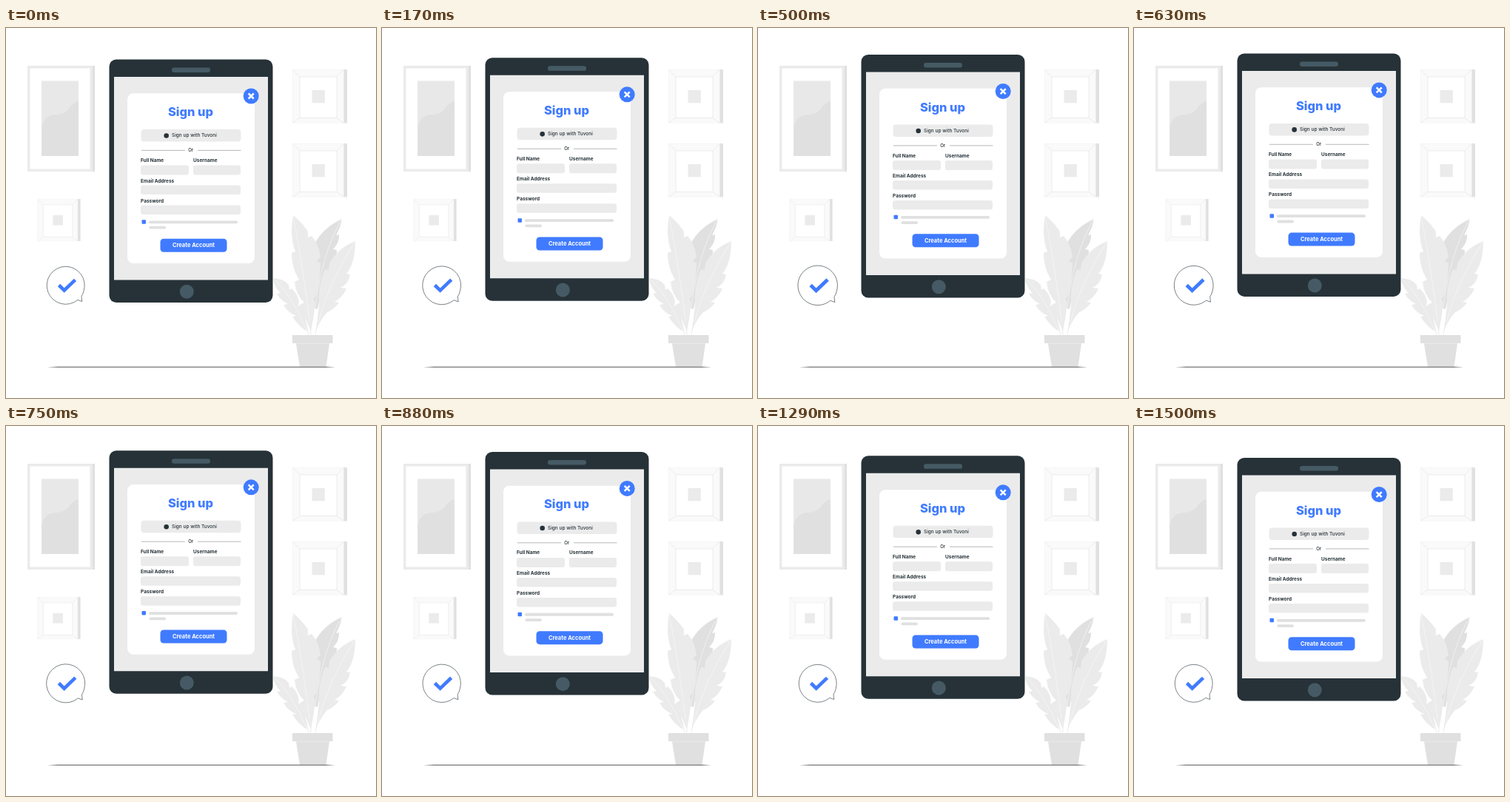
Write an HTML page that moves like this. It is 500 px wide and 500 px high and loops after 1.54 s.

```html
<!DOCTYPE html>
<html lang="en">
<head>
<meta charset="utf-8">
<title>Sign up</title>
<style>
  html, body { margin: 0; height: 100%; overflow: hidden; background: #fff; }
  svg { display: block; width: 100vw; height: 100vh; font: 700 6.5px Inter, sans-serif; fill: #263238; }
  .blue { fill: #407bff; }
  .pale { fill: #ebebeb; }
  .grey { fill: #e0e0e0; }
  .white { fill: #fff; }
  .slate { fill: #455a64; }
  .line { fill: none; stroke: #e6e6e6; stroke-width: .7; }
  .vein { fill: none; stroke: #fafafa; stroke-width: .6; }
</style>
</head>
<body>
<svg viewBox="0 0 500 500">
  <defs>
    <g id="frame">
      <path class="grey" d="M69 0h5v72.500h-5z"/>
      <path fill="#fafafa" stroke="#f0f0f0" stroke-width=".6" d="M.3.3h69v72H.3z"/>
      <path class="line" d="M.5.5 10 10M69 .5 60 10M.5 72 10 65.500M69 72 60 65.500"/>
      <path class="line" style="fill:#fff" d="M10 10h50v55.500H10z"/>
      <path class="pale" d="M26.500 28h17.300v17.300H26.500z"/>
    </g>
  </defs>

  <!-- Wall -->
  <path class="grey" d="M113 51h7v143h-7z"/>
  <path class="pale" d="M29 51h88v143H29z"/>
  <path class="white" d="M32.500 54.500h81v136h-81z"/>
  <path fill="#e8e8e8" d="M48 71.500h50V173H48z"/>
  <path class="grey" d="M48 135C50 124 57 118 66 117C74 117 80 115 85 109C89 103 93 100 98 99V173H48z"/>
  <use href="#frame" x="387" y="56"/>
  <use href="#frame" x="387" y="156"/>
  <use href="#frame" transform="translate(42.500 231) scale(.785)"/>

  <!-- Plant -->
  <path class="pale" d="M361 338Q376 339 382 347L383 354L386 352Q394 359 396 370L395 376L399 374Q406 390 407 410Q396 404 387 390L392 389Q380 384 375 374L381 373Q371 368 366 359L371 358Q362 350 361 338z"/>
  <path class="grey" d="M454 258Q428 270 417 292Q412 330 416 378L421 380Q424 360 432 344L441 330L437 326Q448 313 447 300L442 299Q451 290 450 279L446 280Q452 270 454 258z"/>
  <path class="pale" d="M472 288Q448 298 437 318L436 327L431 326Q421 350 423 374L419 410Q424 395 434 384Q444 380 450 371L444 370Q455 364 460 352L452 351Q463 346 465 333L460 332Q472 318 472 288z"/>
  <path class="pale" d="M388 253Q401 264 408 275L408 283L413 281Q423 292 425 310L420 314L425 318Q424 345 419 362L415 366L418 370Q416 390 412 410Q402 386 397 374L403 371Q392 361 390 343L396 340Q386 325 386 304L391 302Q383 282 388 253z"/>
  <path class="vein" d="M388 254Q402 325 412 410M454 258Q428 300 418 378M472 288Q434 345 419 410M361 338Q386 360 407 410"/>
  <path class="line" d="M406 400 409 415M411 395 412 415M421 397 418 415"/>
  <path class="grey" d="M387 415h54.500v11H387zM392 426.500h45L432.500 458H397z"/>
  <path class="line" d="M392 426.300h45"/>
  <path fill="#8c8c8c" d="M56 458.200 70 457.500H432L445 458.200 432 458.900H70z"/>

  <g id="bubble">
    <path fill="#fff" stroke="#263238" stroke-width=".6" d="M97 367.400A25.500 25.500 0 1 1 105 355.500Q104 360 102 362.500L102.700 369.500z"/>
    <path fill="none" stroke="#407bff" stroke-width="4.600" d="M71.500 347.500 78.700 354.500 93.500 340.300"/>
  </g>

  <g id="tablet">
    <rect x="139.500" y="42.500" width="221" height="328.500" rx="9.500"/>
    <rect class="slate" x="224" y="53.500" width="52" height="6.500" rx="3.200"/>
    <circle class="slate" cx="244.300" cy="356.200" r="9.500"/>
    <path class="pale" d="M146 66h208v274.500H146z"/>
    <rect class="white" x="164" y="88.300" width="172" height="229.700" rx="8"/>
    <circle class="blue" cx="331.200" cy="92" r="10.500"/>
    <path stroke="#fff" stroke-width="2.500" d="m327.700 88.500 7 7m0-7-7 7"/>
    <text class="blue" x="249.500" y="119" text-anchor="middle" font-size="16.500" font-weight="800">Sign up</text>

    <g class="pale">
      <rect x="182.500" y="137" width="135" height="16.500" rx="4"/>
      <rect x="182" y="185.500" width="65" height="13" rx="3"/>
      <rect x="253" y="185.500" width="64" height="13" rx="3"/>
      <rect x="182" y="212.500" width="135" height="12.500" rx="3"/>
      <rect x="182" y="239.500" width="135" height="12.500" rx="3"/>
    </g>
    <circle cx="216.700" cy="145.500" r="3.300"/>
    <text x="224" y="147.500" font-weight="500">Sign up with Tuvoni</text>
    <path stroke="#999" stroke-width=".7" d="M183 165.400h59m17 0h58.500"/>
    <text x="249.700" y="167.300" text-anchor="middle" font-size="6" font-weight="500">Or</text>
    <text x="182" y="181">Full Name</text>
    <text x="253" y="181">Username</text>
    <text x="182" y="208.600">Email Address</text>
    <text x="182" y="235.600">Password</text>

    <rect class="blue" x="183.500" y="259.300" width="5.500" height="5.500" rx="1"/>
    <rect class="grey" x="193" y="260.400" width="120" height="3.800" rx="1.900"/>
    <rect class="grey" x="193.500" y="267.700" width="22.500" height="3.800" rx="1.900"/>
    <rect class="blue" x="208.500" y="284.700" width="90" height="18" rx="4.500"/>
    <text class="white" x="253.500" y="296.200" text-anchor="middle" font-size="7.500">Create Account</text>
  </g>
</svg>
<script>
  const LOOP = 1540, STEP = 1000 / 24, STEPS = 37;
  const tablet = document.getElementById('tablet');
  const bubble = document.getElementById('bubble');
  const start = performance.now();

  function draw() {
    const time = (performance.now() - start) % LOOP;
    const step = Math.floor(time / STEP + 0.1);

    // The tablet floats up and down at constant speed
    const phase = (step + 1) / STEPS;
    const lift = 10 * (1 - Math.abs(1 - 2 * phase));
    tablet.setAttribute('transform', `translate(0 ${0.54 - lift})`);

    // The bubble swells once, then rests
    const swell = Math.max(0, 1 - Math.abs(step * STEP - 480) / 480);
    bubble.setAttribute('transform', `translate(81 347.5) scale(${1 + 0.05 * swell}) translate(-81 -347.5)`);

    requestAnimationFrame(draw);
  }
  draw();
</script>
</body>
</html>
```
